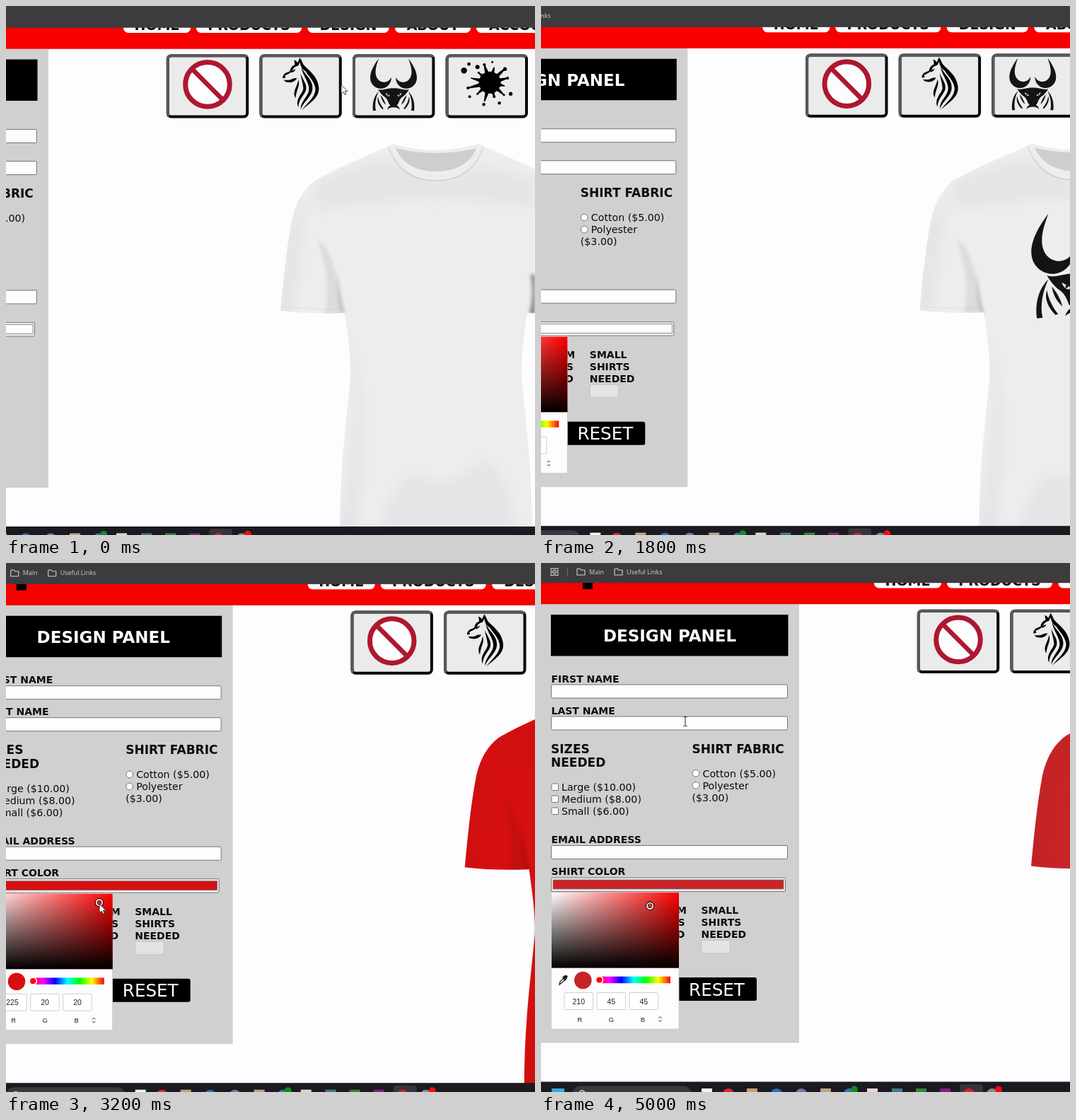
Write an HTML page that moves like this. It is 748 px wide and 748 px high and loops after 5100 ms.

```html
<!DOCTYPE html>
<html lang="en">
<head>
<meta charset="utf-8">
<title>Shirt designer</title>
<style>
  html, body { margin: 0; width: 100%; height: 100%; overflow: hidden; background: #fdfcfe; }
  svg { display: block; width: 748px; height: 748px; }
  text { font-family: "DejaVu Sans", sans-serif; fill: #0b0b0c; white-space: pre; }
  .b { font-weight: bold; }
  .ui { font-family: "Open Sans", sans-serif; font-size: 9px; fill: #d2d1d3; }
  .num { font-family: "Liberation Sans", Arial, sans-serif; font-size: 10.5px; text-anchor: middle; fill: #222; }
</style>
</head>
<body>
<svg viewBox="0 0 748 748" xmlns="http://www.w3.org/2000/svg">
  <defs>
    <linearGradient id="white"><stop stop-color="#fff"/><stop offset="1" stop-color="#fff" stop-opacity="0"/></linearGradient>
    <linearGradient id="black" x2="0" y2="1"><stop stop-opacity="0"/><stop offset="1"/></linearGradient>
    <linearGradient id="hue"></linearGradient>
    <filter id="soft" x="-50%" y="-50%" width="200%" height="200%"><feGaussianBlur stdDeviation="9"/></filter>
    <filter id="fine" x="-50%" y="-50%" width="200%" height="200%"><feGaussianBlur stdDeviation="2.5"/></filter>
    <path id="half" d="M608 246 C580 246 560 233 549 208 L541 198.500 C505 214 470 228 437 247 C419 260 409 280 404 303 C396 345 392 390 388 431 Q430 436 477 434 L479 434 C483 465 488 495 487 525 C484 560 479 600 476 640 Q472 690 472 745 L608.5 745 Z"/>
    <clipPath id="cloth">
      <use href="#half"/><use href="#half" transform="translate(1216 0) scale(-1 1)"/>
    </clipPath>
    <g id="bullSide">
      <path d="M-42 0 C-54 16 -66 36 -66 54 C-66 74 -50 86 -34 85 C-18 84 -6 70 -6 53 C-11 62 -18 67 -28 67 C-42 66 -51 54 -51 38 C-51 24 -46 12 -42 0Z"/>
      <path d="M-42 93 C-56 106 -61 128 -58 148 L-50 147 C-54 130 -50 110 -42 93Z"/>
      <path d="M-44 108 C-48 120 -42 133 -32 143 L-28 142 C-36 132 -42 120 -44 108Z"/>
      <path d="M-37 103 C-35 115 -30 124 -22 131 C-25 120 -30 111 -37 103Z"/>
    </g>
    <g id="bull">
      <use href="#bullSide"/><use href="#bullSide" transform="scale(-1 1)"/>
      <path d="M-44 87 C-34 92 -22 84 0 84 C22 84 34 92 44 87 C39 96 34 101 29 106 C22 110 17 116 13 128 L8 134 Q0 137 -8 134 L-13 128 C-17 116 -22 110 -29 106 C-34 101 -39 96 -44 87Z"/>
      <path d="M-18 145 C-14 126 14 126 18 145 C10 136 -10 136 -18 145Z"/>
      <path fill="#eee" d="M-23 97 L-11 104 L-12 107 Q-20 107 -23 97Z M23 97 L11 104 L12 107 Q20 107 23 97Z"/>
      <circle cx="-16" cy="103" r="2"/><circle cx="16" cy="103" r="2"/>
    </g>
    <g id="wolf">
      <path d="M50 15 L49 8 Q52 9 54 12 L57 5 C62 11 62 18 65 24 C60 21 58 16 57 11 L55 16 C52 17 49 18 48 20 C46 26 41 28 36 30 L37 33 L33 34 Q32 31 36 27 L43 24 Q44 17 50 15Z"/>
      <path d="M45 24 L51 21 Q50 25 45 26Z M34 36 Q39 37 44 36 Q49 33 53 34 C50 39 44 41 37 39Z"/>
      <path d="M58 9 C64 20 83 28 84 48 C84 62 72 68 60 79 C68 68 80 60 79 48 C77 34 62 26 58 9Z"/>
      <path d="M59 18 C64 29 76 36 75 49 C74 60 63 66 58 78 C58 66 70 59 70 49 C70 39 61 30 59 18Z"/>
      <path d="M58 27 C61 36 67 41 66 49 C65 57 55 63 55 75 C50 64 60 57 62 49 C62 42 59 36 58 27Z"/>
      <path d="M55 36 C58 45 52 50 51 62 C46 53 53 47 55 36Z"/>
    </g>
    <g id="ban" fill="none" stroke="#ae1730" stroke-width="7">
      <circle cx="58.200" cy="42.700" r="31.300" fill="#fdfcfe"/><path stroke-width="6.500" d="M36 20.500 L80.400 65"/>
    </g>
    <g id="splat"></g>
  </defs>
  <rect width="748" height="748" fill="#fdfcfe"/>
  <g id="world"></g>
</svg>
<script>
const $ = id => document.getElementById(id);
const rect = (x, y, w, h, fill, more = '') => `<rect x="${x}" y="${y}" width="${w}" height="${h}" fill="${fill}" ${more}/>`;
const text = (s, x, y, size, cls = '', more = '') => `<text x="${x}" y="${y}" font-size="${size}" class="${cls}" ${more}>${s}</text>`;
const dot = (x, y, r, fill, more = '') => `<circle cx="${x}" cy="${y}" r="${r}" fill="${fill}" ${more}/>`;
const edge = 'stroke="#767676" rx="1.5"';
const field = y => rect(14.5, y, 334, 19, '#fdfcfe', edge);

$('hue').innerHTML = [0, 300, 240, 180, 120, 60, 0]
  .map((h, i) => `<stop offset="${i / 6}" stop-color="hsl(${h} 100% 50%)"/>`).join('');

// Ink blot: a core with uneven tapering rays and loose drops
function splat() {
  let s = dot(62.5, 40, 15.5, '#000');
  for (let i = 0; i < 12; i++) {
    const a = i * 0.524 + 0.25, r = 21 + (i * 7) % 12, tip = 0.9 + (i % 3) * 0.6;
    const at = (k, d) => `${(62.5 + k * Math.cos(a + d)).toFixed(1)} ${(40 + k * Math.sin(a + d) * 0.9).toFixed(1)}`;
    s += `<path d="M${at(13, -.24)} L${at(r, -.03)} L${at(r, .03)} L${at(13, .24)}Z"/>`;
    const p = at(r, 0).split(' ');
    s += dot(p[0], p[1], tip, '#000');
  }
  for (const [x, y, r] of [[26, 23, 4.2], [33, 14, 2.4], [45, 18, 3], [84, 21, 2.6], [34, 60, 2], [54, 71, 2.2], [76, 69, 2.2], [92, 56, 2.6], [66, 11, 1.5]])
    s += dot(x, y, r, '#000');
  return s;
}
$('splat').innerHTML = splat();

function button(i, art) {
  const x = 531.8 + i * 131.6;
  return `<g transform="translate(${x} 65.700)">
    ${rect(2, 2, 112.4, 86.4, '#ebebec', 'rx="5" stroke="#050505" stroke-width="4"')}
    <path d="M3 88 Q2 86 2 83 V7 Q2 2 7 2 H109 Q113 2 114 4" fill="none" stroke="#58575a" stroke-width="4"/>
    ${art}</g>`;
}

function panel() {
  const label = (s, x, y) => text(s, x, y, 14, 'b');
  const head = (s, x, y) => text(s, x, y, 17, 'b');
  const item = (s, x, y) => text(s, x, y, 14.2);
  let s = rect(-10, 58, 375, 620.500, '#d1d0d1') + rect(14, 73, 335.500, 58.500, '#000');
  s += text('DESIGN PANEL', 182, 111, 23, 'b', 'text-anchor="middle" style="fill:#fff"');
  s += label('FIRST NAME', 14.500, 168.500) + field(172) + label('LAST NAME', 14.500, 213.500) + field(217);
  s += head('SIZES', 14, 268.500) + head('NEEDED', 14, 288) + head('SHIRT FABRIC', 213.500, 268.500);
  ['Large ($10.00)', 'Medium ($8.00)', 'Small ($6.00)'].forEach((t, i) => {
    s += rect(15, 312 + i * 17, 9.500, 9.500, '#fff', edge) + item(t, 29, 322 + i * 17);
  });
  ['Cotton ($5.00)', 'Polyester'].forEach((t, i) => {
    s += dot(219, 297.3 + i * 17, 4.9, '#fff', 'stroke="#767676"') + item(t, 228.500, 302.5 + i * 17);
  });
  s += item('($3.00)', 213.500, 336.500);
  s += label('EMAIL ADDRESS', 14.500, 396) + field(399.500) + label('SHIRT COLOR', 14.500, 441);
  s += rect(14.5, 445, 331, 19.500, '#efeff0', edge) + rect(17, 448, 326, 13, '#fff', 'id="swatch" stroke="#777" stroke-width=".8"');
  [['MEDIUM', 206], ['SHIRTS', 203.500], ['NEEDED', 203.500]].forEach(([t, x], i) =>
    s += text(t, x, 496 + i * 17, 14, 'b', 'text-anchor="end"'));
  ['SMALL', 'SHIRTS', 'NEEDED'].forEach((t, i) => s += label(t, 226.500, 496 + i * 17));
  s += rect(227, 533.500, 40.500, 18.500, '#e4e3e4', 'stroke="#c3c2c4" rx="1.5"');
  s += rect(191, 586, 114, 33, '#000', 'rx="3"') + text('RESET', 248.5, 611.500, 24.6, '', 'text-anchor="middle" style="fill:#fff"');
  return s;
}

function shirt() {
  const shade = (d, o, f = 'soft', c = '#000') => `<path d="${d}" fill="${c}" opacity="${o}" filter="url(#${f})"/>`;
  return `<g transform="translate(305 -2.500)">
    <path id="inside" d="M541 198.500 Q548 193 553 197 Q608 211 664 196 Q670 193 676 199 L664 230 Q608 265 552 230Z"/>
    <path d="M551 201 Q608 215 665 201 C657 223 635 234 608 234 C580 234 560 223 551 201Z" opacity=".13"/>
    <g id="body"><use href="#half"/><use href="#half" transform="translate(1216 0) scale(-1 1)"/></g>
    <g clip-path="url(#cloth)">
      ${shade('M380 440 L400 310 L428 260 L418 330 L405 440Z', .035)}
      ${shade('M440 330 Q470 350 474 440 L450 440 Q462 390 440 330Z', .07, 'fine')}
      ${shade('M469 376 Q471 412 479 436 L475 436 Q468 410 469 376Z', .25, 'fine')}
      ${shade('M480 470 Q508 560 470 745 L494 745 Q520 560 486 470Z', .035)}
      ${shade('M530 745 Q535 690 575 660 Q640 690 670 640 Q715 655 720 745Z', .03)}
      ${shade('M435 250 Q520 215 550 215 Q600 262 670 225 L750 245 L750 285 Q600 260 435 290Z', .03)}
      ${shade('M742 380 Q747 410 740 436 L748 436 L748 380Z', .45, 'fine')}
      <path d="M388 425 Q430 430 478 428" fill="none" stroke="#000" opacity=".05"/>
    </g>
    <path d="M541 199 C552 232 575 247 608 247 C641 247 664 232 675 199" fill="none" stroke="#000" opacity=".12" stroke-width="1.200"/>
  </g>
  <use id="print" href="#bull" x="917" y="292" fill="#141316"/>`;
}

function bars() {
  let s = rect(-10, 20, 1100, 38.200, '#f60000') + rect(59, 23, 14, 14, '#000');
  [['HOME', 471, 95], ['PRODUCTS', 574, 149], ['DESIGN', 731.5, 115], ['ABOUT', 855, 107], ['ACCOUNT', 970, 139]].forEach(([t, x, w]) => {
    s += rect(x, 5, w, 30.500, '#fdfcfe', 'rx="7"') + text(t, x + w / 2, 31.700, 19, 'b', 'text-anchor="middle"');
  });
  s += rect(-10, -10, 1100, 38.200, '#3c3b3e');
  for (const [x, y] of [[14, 7.500], [20, 7.500], [14, 13.500], [20, 13.500]])
    s += rect(x, y, 4, 4, 'none', 'stroke="#d2d1d3"');
  s += rect(37, 6, 1, 13, '#69686b');
  for (const [t, x] of [['Main', 50], ['Useful Links', 103]]) {
    s += `<path d="M${x + 1} 17 V9 Q${x + 1} 8 ${x + 2} 8 H${x + 5} L${x + 7} 10 H${x + 12} V17Z" fill="none" stroke="#d2d1d3" stroke-width="1.100"/>`;
    s += text(t, x + 18, 15.500, 9, 'ui');
  }
  s += rect(-10, 733.500, 1100, 30, '#1b1a21');
  s += rect(15, 743, 18, 18, '#38a8dc') + rect(44, 739.500, 169, 26, '#39383e', 'rx="12"');
  s += dot(58, 750, 4, 'none', 'stroke="#ddd" stroke-width="1.5"') + rect(592, 737, 33, 30, '#39343b', 'rx="4"');
  const squares = [[227, '#f3f3f3'], [291, '#c9a070'], [395, '#c2a084'], [461, '#e8d3d3'], [496, '#3f7b8b'], [530, '#33853a'], [564, '#82207e']];
  for (const [x, c] of squares) s += rect(x, 743, 15, 15, c);
  for (const [x, c] of [[265, '#dc2834'], [333, '#2d6cc0'], [368, '#8d66ab'], [436, '#3971b8'], [605, '#cf2432'], [638, '#8b8a8f']])
    s += dot(x, 751, 8, c);
  return s + dot(443, 744.500, 5, '#138a1d') + dot(647, 744.500, 5, '#f20d10');
}

function picker() {
  let s = rect(14.500, 465.500, 180.500, 193.500, '#fdfcfe', 'stroke="#c9c8ca" stroke-width=".8"');
  for (const f of ['#f00', 'url(#white)', 'url(#black)']) s += rect(15, 466, 180, 106.500, f);
  s += '<path d="M26 596 L27 592 L32 587 L34 589 L29 594Z" fill="none" stroke="#222" stroke-width="1.300"/><path d="M31 586 L33 584 L36 587 L34 590Z M33 585 Q36 582 37 585 L35 588Z" stroke="#222" stroke-width="1.500"/>';
  s += dot(59.3, 590, 12.300, '#fff', 'id="chip"') + rect(79, 584.700, 104, 9.500, 'url(#hue)');
  s += dot(82.5, 589.500, 5, '#f00', 'stroke="#fff" stroke-width="1.800"');
  ['R', 'G', 'B'].forEach((c, i) => {
    s += rect(33 + i * 46, 607.500, 40.500, 24, '#fff', 'stroke="#cfced0" rx="1"');
    s += text('', 53.3 + i * 46, 623.500, 10.5, 'num', `id="n${i}"`) + text(c, 55 + i * 44.5, 648.500, 10, 'num', 'style="font-size:9.5px"');
  });
  s += '<path d="M166.500 643.500 L168.500 641.500 L170.500 643.500 M166.500 646.500 L168.500 648.500 L170.500 646.500" fill="none" stroke="#222"/>';
  return `<g id="picker">${s}<g id="ring" fill="none">${dot(0, 0, 4.6, 'none', 'stroke="#000" stroke-width="3.200"')}${dot(0, 0, 4.3, 'none', 'stroke="#fff" stroke-width="1.700"')}</g></g>`;
}

const arts = ['<use href="#ban"/>', '<use href="#wolf"/>', '<use href="#bull" transform="translate(58 6) scale(.5)" fill="#141316"/>', '<use href="#splat"/>'];
$('world').innerHTML = panel() + arts.map((a, i) => button(i, a)).join('') + shirt() + bars() + picker() +
  `<path id="arrow" d="M0 0 V12.500 L3 9.800 L5 14 L7 13 L5.200 9 H9Z" fill="#fff" stroke="#333" stroke-width=".9"/>
   <path id="beam" d="M-2.500 -6.500 H-.7 L0 -6 L.7 -6.500 H2.500 M0 -6 V6 M-2.500 6.500 H-.7 L0 6 L.7 6.500 H2.500" fill="none" stroke="#222"/>`;

// Keys are [time, a, b]
const pan = [[0, -305, 2.5], [800, -219.7, 3.8], [1800, -157.7, 1.7], [2400, -108.3, 1.7], [3200, -44.3, 1.7], [3800, -22.8, 0], [4800, 0, 0]];
const mouse = [[0, 779, 109], [300, 832, 112], [400, 832, 112], [800, 670, 249], [1400, 115, 450], [1600, 115, 450], [2200, 134, 510],
  [2400, 135.5, 516.5], [3200, 176.5, 480.5], [3800, 154, 483], [4200, 154, 483], [4800, 202, 222], [5000, 204, 224]];
const tone = [[2200, .62, .56], [2400, .64, .515], [3200, .911, .8824], [3800, .7857, .8235]];

const slope = (k, i, c) => (k[i + 1][c] - k[i][c]) / (k[i + 1][0] - k[i][0]);
function tangent(k, i, c) {
  if (i === 0) return slope(k, 0, c);
  if (i === k.length - 1) return 0;
  const a = slope(k, i - 1, c), b = slope(k, i, c);
  return a * b > 0 ? 2 * a * b / (a + b) : 0;
}
function sample(k, t, curve) {
  if (t <= k[0][0]) return k[0].slice(1);
  const i = k.findIndex((p, j) => j < k.length - 1 && t < k[j + 1][0]);
  if (i < 0) return k[k.length - 1].slice(1);
  const h = k[i + 1][0] - k[i][0], u = (t - k[i][0]) / h, e = u * u * (3 - 2 * u);
  return [1, 2].map(c => {
    const v = k[i][c] + (k[i + 1][c] - k[i][c]) * e;
    return curve ? v + h * u * (1 - u) * ((1 - u) * tangent(k, i, c) - u * tangent(k, i + 1, c)) : v;
  });
}

const show = (id, on) => $(id).setAttribute('visibility', on ? 'visible' : 'hidden');
const move = (id, x, y) => $(id).setAttribute('transform', `translate(${x.toFixed(2)} ${y.toFixed(2)})`);
const fill = (id, c) => $(id).setAttribute('fill', c);

function draw(t) {
  move('world', ...sample(pan, t, true));
  const [mx, my] = sample(mouse, t), typing = t > 4300 && my < 237;
  move('arrow', mx, my);
  move('beam', mx, my);
  show('arrow', !typing);
  show('beam', typing);
  show('print', t >= 400);
  show('picker', t >= 1500);

  const dyed = t >= 2200, [s, v] = dyed ? sample(tone, t) : [0, 1];
  const r = Math.round(255 * v), g = Math.round(255 * v * (1 - s));
  const ink = dyed ? `rgb(${r * .955 | 0},${g * .8 | 0},${g * .88 | 0})` : '#fdfcfe';
  const cloth = dyed ? ink : '#edecee';
  fill('body', cloth);
  fill('inside', cloth);
  fill('swatch', ink);
  fill('chip', ink);
  move('ring', 15 + 177 * s, 466 + 106.5 * (1 - v));
  [r, g, g].forEach((n, i) => $('n' + i).textContent = n);
}

const start = performance.now();
function tick(now) {
  const t = Math.max(0, now - start) % 5100;
  draw(Math.floor(t / 100) * 100);
  requestAnimationFrame(tick);
}
draw(0);
requestAnimationFrame(tick);
</script>
</body>
</html>
```
